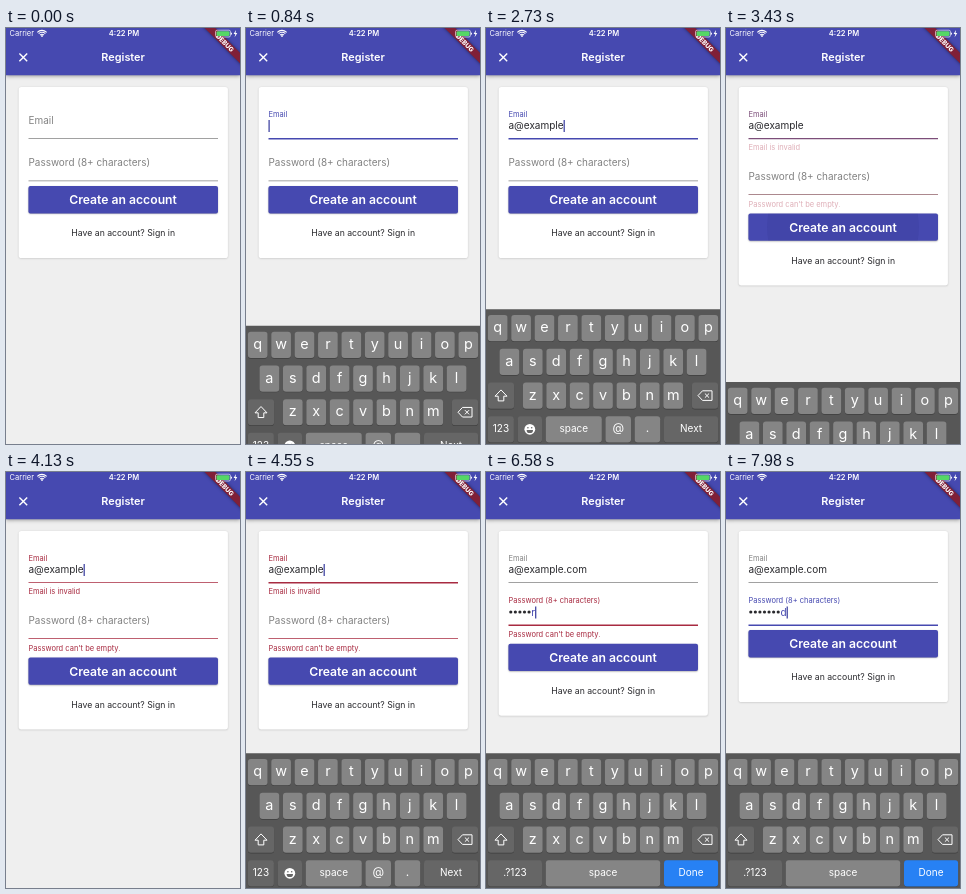
Write an HTML page with a canvas that moves like this. It is 234 px wide and 416 px high and loops after 8000 ms.

```html
<!DOCTYPE html>
<html lang="en">
<head>
<meta charset="utf-8">
<title>Register form</title>
<style>
  html, body { margin: 0; width: 100%; height: 100%; overflow: hidden; background: #efefef; }
  canvas { display: block; width: 234px; height: 416px; }
</style>
</head>
<body>
<canvas id="stage"></canvas>
<script>
const W = 234, H = 416, LOOP = 8000;
const canvas = document.getElementById('stage');
const ctx = canvas.getContext('2d');
const dpr = window.devicePixelRatio || 1;
canvas.width = W * dpr;
canvas.height = H * dpr;

const INDIGO = [70, 73, 176], RED = [168, 43, 65], GREY = [130, 130, 130];
const INK = '#29292d';
const LEFT = 22.5;

// Moments of the story, in ms
const FOCUS = 630, SUBMIT = 3340, REFOCUS = 4130, NEXT = 5250, VALID = 7140;
const EMAIL = 'a@example.com';
const EMAIL_KEYS = [1330, 1400, 1470, 1610, 1820, 1960, 2170, 2450, 2520, 4900, 4970, 5040, 5110];
const SECRET = 'passwrod';
const SECRET_KEYS = [5740, 5880, 6020, 6160, 6300, 6580, 7000, VALID];

const ramp = (t, start, length = 200) => Math.min(1, Math.max(0, (t - start) / length));
const easeOut = x => 1 - (1 - x) ** 3;
const lerp = (a, b, x) => a + (b - a) * x;
const mix = (a, b, x) => a.map((v, i) => lerp(v, b[i], x));
const rgb = (c, alpha = 1) => `rgba(${c.map(Math.round).join(',')},${alpha})`;
const typed = (keys, t) => keys.filter(k => k <= t).length;

function text(str, x, y, size, color, { weight = 400, align = 'left' } = {}) {
  ctx.font = `${weight} ${size}px Inter, sans-serif`;
  ctx.textAlign = align;
  ctx.fillStyle = color;
  ctx.fillText(str, x, y);
}

function box(x, y, w, h, r, color) {
  ctx.fillStyle = color;
  ctx.beginPath();
  ctx.roundRect(x, y, w, h, r);
  ctx.fill();
}

function shadowed(blur, dy, color, draw) {
  ctx.save();
  ctx.shadowBlur = blur * dpr;
  ctx.shadowOffsetY = dy * dpr;
  ctx.shadowColor = color;
  draw();
  ctx.restore();
}

function stroke(points, color, width, close = false) {
  ctx.strokeStyle = color;
  ctx.lineWidth = width;
  ctx.beginPath();
  points.forEach(([x, y]) => ctx.lineTo(x, y));
  if (close) ctx.closePath();
  ctx.stroke();
}

function cross(x, y, r, width) {
  stroke([[x - r, y - r], [x + r, y + r]], '#fff', width);
  stroke([[x + r, y - r], [x - r, y + r]], '#fff', width);
}

function dot(x, y, r, color) {
  ctx.fillStyle = color;
  ctx.beginPath();
  ctx.arc(x, y, r, 0, Math.PI * 2);
  ctx.fill();
}

function statusBar() {
  text('Carrier', 3.5, 8, 7.5, '#fff');
  text('4:22 PM', 118, 8, 7.5, '#fff', { weight: 600, align: 'center' });
  ctx.strokeStyle = '#fff';
  ctx.lineWidth = 1.1;
  for (const r of [2.6, 4.6, 6.4]) {
    ctx.beginPath();
    ctx.arc(36, 8.8, r, -Math.PI * 0.76, -Math.PI * 0.24);
    ctx.stroke();
  }
  dot(36, 8, 0.9, '#fff');

  ctx.lineWidth = 0.6;
  ctx.beginPath();
  ctx.roundRect(209.5, 2.2, 15, 6.8, 1.6);
  ctx.stroke();
  box(210.5, 3.2, 13, 4.8, 1, '#55d866');
  box(225.1, 4.5, 0.9, 2.2, 0.4, '#fff');
  ctx.fillStyle = '#fff';
  ctx.beginPath();
  [[230, 2], [227.6, 6.1], [229.3, 6.1], [228.6, 9.2], [231.3, 4.9], [229.6, 4.9]].forEach(p => ctx.lineTo(...p));
  ctx.fill();
}

function appBar() {
  shadowed(4, 1, 'rgba(0,0,0,.4)', () => box(0, 0, W, 47.2, 0, rgb(INDIGO)));
  cross(17.3, 29.4, 3.9, 1.4);
  text('Register', 117.1, 33, 10.9, '#fff', { weight: 600, align: 'center' });
}

function debugRibbon() {
  ctx.save();
  ctx.translate(W, 0);
  ctx.rotate(Math.PI / 4);
  shadowed(3.5, 0, 'rgba(0,0,0,.5)', () => box(-36, 17.5, 72, 7.5, 0, 'rgb(128,31,56)'));
  text('DEBUG', 0, 23.5, 6.4, '#fff', { weight: 800, align: 'center' });
  ctx.restore();
}

function caret(x, y) {
  box(x, y - 9, 1.2, 12, 0, '#34389c');
}

// A Material text field whose underline sits at `line`.
function field(label, error, line, { focus, err, float }) {
  const tone = mix(mix(GREY, INDIGO, focus), RED, err);
  const labelTone = mix(tone, GREY, 1 - float);
  text(label, LEFT, lerp(line - 14.4, line - 21.6, float), lerp(9.95, 7.5, float), rgb(labelTone));
  box(LEFT, line - 0.3, 189.5, lerp(0.75, 1.4, focus), 0, rgb(tone));
  if (err > 0) text(error, LEFT, line + 12, 7.5, rgb(RED, err));
}

function emailField(t) {
  const line = 110.4;
  field('Email', 'Email is invalid', line, {
    focus: ramp(t, FOCUS) - ramp(t, SUBMIT) + ramp(t, REFOCUS) - ramp(t, NEXT),
    err: ramp(t, SUBMIT, 240) - ramp(t, NEXT),
    float: easeOut(ramp(t, FOCUS)),
  });
  const value = EMAIL.slice(0, typed(EMAIL_KEYS, t));
  text(value, LEFT, line - 9.3, 10, INK);
  const focused = (t >= FOCUS && t < SUBMIT) || (t >= REFOCUS && t < NEXT);
  if (focused) caret(LEFT + ctx.measureText(value).width, line - 9.3);
}

function passwordField(t, line) {
  field('Password (8+ characters)', "Password can't be empty.", line, {
    focus: ramp(t, NEXT),
    err: ramp(t, SUBMIT, 240) - ramp(t, VALID),
    float: easeOut(ramp(t, NEXT)),
  });
  if (t < NEXT) return;
  const base = line - 9.3, pitch = 4.57;
  const count = typed(SECRET_KEYS, t);
  let x = LEFT;
  for (let i = 0; i < count - 1; i++, x += pitch) dot(x + pitch / 2, base - 3.5, 1.6, INK);
  if (count) {
    const last = SECRET[count - 1];
    text(last, x, base, 10, rgb(INDIGO));
    x += ctx.measureText(last).width;
  }
  caret(x, base);
}

function submitButton(t, y) {
  const shape = [22.4, y, 189.6, 27.3, 2];
  shadowed(1.6, 0.6, 'rgba(0,0,0,.3)', () => box(...shape, rgb(INDIGO)));
  const press = ramp(t, 3150, 500);
  if (press > 0 && press < 1) {
    ctx.save();
    ctx.beginPath();
    ctx.roundRect(...shape);
    ctx.clip();
    dot(117, y + 13.6, 135 * press, `rgba(20,20,70,${0.16 * (1 - press)})`);
    ctx.restore();
  }
  text('Create an account', 117, y + 18, 12.2, '#fff', { weight: 600, align: 'center' });
}

function card(t) {
  const row = 13.7;
  const emailGap = t >= SUBMIT && t < NEXT + 200 ? row : 0;
  const shift = emailGap + (t >= SUBMIT && t < VALID + 200 ? row : 0);
  shadowed(2, 0.6, 'rgba(0,0,0,.18)', () => box(12.7, 59, 209.2, 171 + shift, 2.6, '#fff'));
  emailField(t);
  passwordField(t, 152.8 + emailGap);
  submitButton(t, 158.1 + shift);
  text('Have an account? Sign in', 117.2, 208.3 + shift, 8.7, INK, { align: 'center' });
}

const KEY = '#858585', KEY_DARK = '#666666';

function key(x, y, w, label, color = KEY, size = 10) {
  box(x, y + 0.7, w, 26.2, 3, '#3f3f3f');
  box(x, y, w, 26.2, 3, color);
  const base = size > 12 ? y + 17.1 : y + 16;
  text(label, x + w / 2, base, size, '#fff', { align: 'center' });
}

function shiftIcon(x, y) {
  const half = [[0, -6], [6, 0.3], [2.8, 0.3], [2.8, 5], [-2.8, 5], [-2.8, 0.3], [-6, 0.3]];
  stroke(half.map(([dx, dy]) => [x + dx, y + dy]), '#fff', 1, true);
}

function deleteIcon(x, y) {
  stroke([[x - 7, y], [x - 2.5, y - 4.8], [x + 7, y - 4.8], [x + 7, y + 4.8], [x - 2.5, y + 4.8]], '#fff', 1, true);
  cross(x + 2, y, 2.1, 1);
}

function smiley(x, y) {
  dot(x, y, 5.4, '#fff');
  dot(x - 1.9, y - 1.5, 0.8, KEY_DARK);
  dot(x + 1.9, y - 1.5, 0.8, KEY_DARK);
  ctx.fillStyle = KEY_DARK;
  ctx.beginPath();
  ctx.arc(x, y + 0.6, 3.2, 0, Math.PI);
  ctx.fill();
}

function keyboard(t) {
  const up = easeOut(ramp(t, FOCUS, 420)) - easeOut(ramp(t, SUBMIT, 400)) + easeOut(ramp(t, REFOCUS + 40, 360));
  if (up <= 0) return;
  ctx.save();
  ctx.translate(0, (1 - up) * 135);
  box(0, 281.2, W, 135, 0, '#575757');
  const rowY = r => 287.1 + 33.7 * r;
  const pitch = 23.4;
  ['qwertyuiop', 'asdfghjkl', 'zxcvbnm'].forEach((letters, r) => {
    const first = W / 2 - letters.length * pitch / 2 + 1.85;
    [...letters].forEach((c, i) => key(first + i * pitch, rowY(r), 19.7, c, KEY, 14.4));
  });
  key(1.9, rowY(2), 26.2, '', KEY_DARK);
  shiftIcon(15, rowY(2) + 13.4);
  key(205.9, rowY(2), 26.2, '', KEY_DARK);
  deleteIcon(219, rowY(2) + 13.1);

  const y = rowY(3);
  if (t < NEXT + 70) {
    key(1.9, y, 26, '123', KEY_DARK);
    key(31.6, y, 24.4, '', KEY_DARK);
    smiley(43.8, y + 13.1);
    key(59.8, y, 56, 'space');
    key(119.5, y, 25.5, '@', KEY, 12);
    key(148.7, y, 25.5, '.', KEY, 12);
    key(178, y, 54.1, 'Next', KEY_DARK);
  } else {
    key(1.9, y, 54.1, '.?123', KEY_DARK);
    key(59.8, y, 114.4, 'space');
    key(178, y, 54.1, 'Done', '#2781f4');
  }
  ctx.restore();
}

const began = performance.now();

function frame() {
  const t = (performance.now() - began) % LOOP;
  ctx.setTransform(dpr, 0, 0, dpr, 0, 0);
  box(0, 0, W, H, 0, '#efefef');
  card(t);
  appBar();
  keyboard(t);
  debugRibbon();
  statusBar();
  requestAnimationFrame(frame);
}
frame();
</script>
</body>
</html>
```
